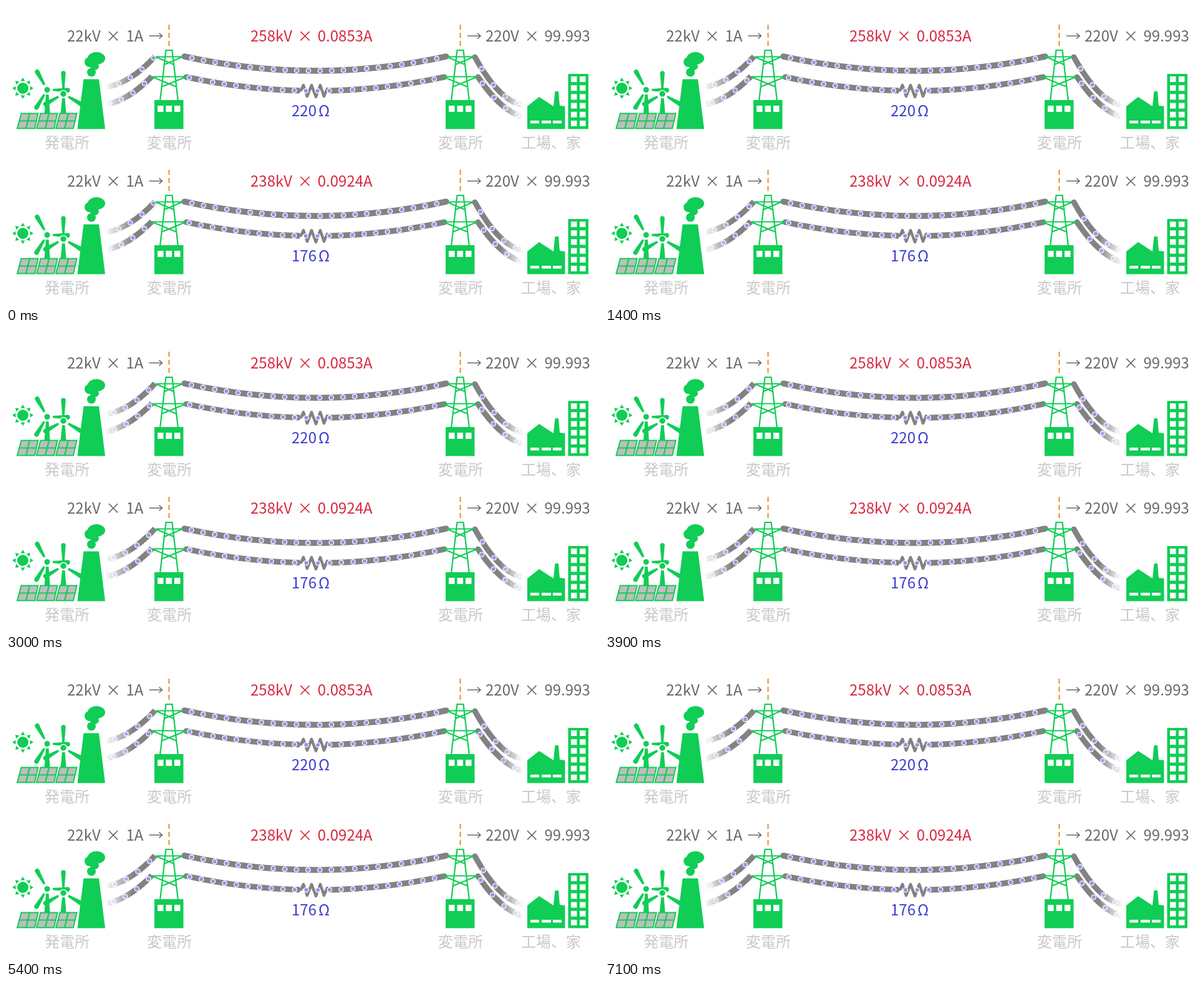
Recreate the animation shown at these times as an HTML page. Size 951x480 px, loop 7200 ms.

```html
<!DOCTYPE html>
<html lang="ja">
<head>
<meta charset="utf-8">
<style>
html, body { margin: 0; width: 100%; height: 100%; overflow: hidden; background: #fff; }
svg { display: block; width: 951px; height: 480px; }
text { font: 300 24px "Noto Sans CJK JP", "Noto Sans CJK", "Noto Sans", sans-serif; fill: #686868; word-spacing: 3px; }
.hot { fill: #d8283f; }
.ohm { fill: #3c3cd2; }
.label { fill: #c8c8c8; }
.g { fill: #10cd55; }
.gl { fill: none; stroke: #10cd55; stroke-width: 2.2; stroke-linejoin: round; }
.wire { fill: none; stroke: #828282; }
.dot { fill: #9692ec; stroke: #fff; stroke-width: 1.3; }
</style>
</head>
<body>
<svg id="stage" viewBox="0 0 951 480">
  <defs>
    <linearGradient id="fadeL"><stop offset="0" stop-color="#fff"/><stop offset="1" stop-color="#fff" stop-opacity="0"/></linearGradient>
    <linearGradient id="fadeR"><stop offset="0" stop-color="#fff" stop-opacity="0"/><stop offset=".85" stop-color="#fff"/></linearGradient>

    <path id="blade" d="M-1.700 -9L-3.700 -33a3.700 3.700 0 0 1 7.400 0L1.700 -9z"/>

    <g id="tower">
      <path d="M261.500 30V67" fill="none" stroke="#ee8a28" stroke-width="2" stroke-dasharray="8 5"/>
      <path class="gl" d="M255.500 71H267.500M256.500 71L247 153M266.500 71L276 153
        M240 81.500H283M234 113.500H289M241 82L269 94M282 82L254 94
        M235 114L274 130M288 114L249 130"/>
      <rect class="g" x="238" y="151" width="46.500" height="46.500"/>
      <path fill="#fff" d="M243 160h9.500v10h-9.500zM256.500 160h9.500v10h-9.500zM270 160h9.500v10h-9.500z"/>
    </g>

    <g id="plant" class="g">
      <circle cx="27" cy="132" r="9"/>
      <g id="rays"></g>
      <path d="M64 142h4.500l2 31h-9zM90 148h4.500l2 25h-9z"/>
      <g id="blades"></g>
      <circle cx="66" cy="134.500" r="4.500"/>
      <circle cx="92" cy="141" r="5.500" stroke="#fff" stroke-width="1.500"/>
      <g id="panels"></g>
      <path d="M124.500 117.500H149L159 197.500H114.500z"/>
      <ellipse cx="145" cy="84" rx="14" ry="10"/>
      <ellipse cx="134" cy="90" rx="8" ry="8"/>
      <ellipse cx="142" cy="97" rx="7" ry="6"/>
      <ellipse cx="137" cy="106.500" rx="7" ry="7"/>
    </g>

    <g id="town" class="g">
      <path d="M836 197.500V161L855 146L878 161L880.500 137H886L888 160L896.500 161V197.500z"/>
      <path fill="#fff" d="M841 184h14v4.500h-14zM859 184h15v4.500h-15zM877 184h14v4.500h-14z"/>
      <rect x="901.500" y="109" width="32.500" height="88.500"/>
      <g id="windows" fill="#fff"></g>
    </g>
  </defs>
</svg>
<script>
const GAP = 18.7, STEP = 100, LOOP = 7200;
const NS = 'http://www.w3.org/2000/svg';
const $ = id => document.getElementById(id);
const range = (n, f) => Array.from({ length: n }, (_, i) => f(i));

// Wires are parabolas: ends (x0,y0) (x1,y1) and control height c.
const wire = (x0, y0, x1, y1, c, width, cap = 'round') => ({ x0, y0, x1, y1, c, width, cap });
const W = {
  left: [wire(162, 130, 239, 81, 123, 9, 'butt'), wire(162, 158, 234, 113, 150, 9, 'butt')],
  mid: [wire(286, 81, 706, 81, 127, 9.5), wire(289, 114, 703, 114, 158.5, 9)],
  right: [wire(752, 82, 828, 159, 151, 9), wire(757, 114, 828, 178, 167, 9)]
};
const heightAt = (w, x) => {
  const t = (x - w.x0) / (w.x1 - w.x0), u = 1 - t;
  return u * u * w.y0 + 2 * u * t * w.c + t * t * w.y1;
};
const wirePath = w => `<path class="wire" stroke-width="${w.width}" stroke-linecap="${w.cap}"
  d="M${w.x0} ${w.y0}Q${(w.x0 + w.x1) / 2} ${w.c} ${w.x1} ${w.y1}"/>`;

const resistor = `<rect x="471" y="122" width="48" height="27" fill="#fff"/>
  <path class="wire" stroke-width="4.500" stroke-linejoin="round" stroke-linecap="round"
  d="M470 135.500H473L477 127L483 145L490 127L497 146L504 127L510 145L515 133L520 135.500"/>`;

const arrow = x => `<path d="M${x} 48H${x + 21}M${x + 16} 43.500L${x + 21} 48L${x + 16} 52.500"
  fill="none" stroke="#686868" stroke-width="1.500"/>`;
const label = (x, s) => `<text class="label" x="${x}" y="228">${s}</text>`;

const row = (i, y, volts, ohms) => `<g transform="translate(0 ${y})">
  ${Object.values(W).flat().map(wirePath).join('')}${resistor}
  <g id="dots${i}"></g>
  <rect x="159" y="76" width="44" height="100" fill="url(#fadeL)"/>
  <rect x="792" y="120" width="44" height="76" fill="url(#fadeR)"/>
  <use href="#tower"/><use href="#tower" x="467"/>
  <use href="#plant"/><use href="#town"/>
  <text x="98" y="57">22kV × 1A</text>${arrow(229.5)}
  <text class="hot" x="392" y="57">${volts}</text>
  ${arrow(740)}<text x="769" y="57">220V × 99.993</text>
  <text class="ohm" x="458" y="177">${ohms}<tspan dx="3">Ω</tspan></text>
  ${label(62, '発電所')}${label(226, '変電所')}${label(693, '変電所')}${label(826, '工場、家')}
</g>`;

const turbine = (x, y, turn) => range(3, i =>
  `<use href="#blade" transform="translate(${x} ${y}) rotate(${turn + i * 120})"/>`).join('');

$('rays').innerHTML = range(8, i =>
  `<path d="M23.500 120.500L27 115L30.500 120.500z" transform="rotate(${i * 45} 27 132)"/>`).join('');
$('blades').innerHTML = turbine(66, 134.5, -29) + turbine(92, 141, 0);
$('panels').innerHTML = [18, 49, 80].map(x => `<g transform="translate(${x} 172.5)">
  <path d="M6.500 0H33.500L28 24H0z" fill="#bebebe" stroke="#10cd55" stroke-width="2"/>
  <path class="gl" stroke-width="1.800" d="M20 0L14 24M3.500 12H31"/></g>`).join('');
$('windows').innerHTML = range(12, i =>
  `<rect x="${906 + i % 2 * 14}" y="${113 + (i >> 1) * 14.2}" width="9.500" height="9"/>`).join('');
$('stage').insertAdjacentHTML('beforeend',
  row(0, 0, '258kV × 0.0853A', '220') + row(1, 233, '238kV × 0.0924A', '176'));

// Step, swing of the 1 A side, then first dot on the 100 A side of each row.
const KEYS = [
  [0, 12, 763, 761], [8, -1, 757, 756], [19, 2, 758, 768], [30, 4, 764, 764],
  [47, -3, 756, 755], [61, 2, 758.5, 757.5], [71, 0, 766, 762]
];
const TURNS = 3;

function pose(step) {
  let i = 0;
  while (i < KEYS.length - 2 && step >= KEYS[i + 1][0]) i++;
  const a = KEYS[i], b = KEYS[i + 1];
  const u = Math.min(1, (step - a[0]) / (b[0] - a[0]));
  const e = (1 - Math.cos(Math.PI * u)) / 2;
  const mix = n => a[n] + (b[n] - a[n]) * e;
  const rush = (i % 2 ? -1 : 1) * TURNS * GAP * e;
  return { swing: mix(1) + 6 * Math.sin(Math.PI * u) ** 2, load: [mix(2) + rush, mix(3) + rush] };
}

const pools = [0, 1].map(i => range(70, () => {
  const c = document.createElementNS(NS, 'circle');
  c.setAttribute('class', 'dot');
  c.setAttribute('r', 3.7);
  return $('dots' + i).appendChild(c);
}));

function draw(step) {
  const { swing, load } = pose(step);
  [0.0853, 0.0924].forEach((amps, i) => {
    let n = 0;
    const fill = (w, phase, pad) => {
      const lo = w.x0 + pad;
      let x = lo + ((phase - lo) % GAP + GAP) % GAP;
      for (; x <= w.x1 - pad; x += GAP) {
        const c = pools[i][n++];
        c.setAttribute('cx', x.toFixed(2));
        c.setAttribute('cy', heightAt(w, x).toFixed(2));
        c.style.display = '';
      }
    };
    fill(W.left[0], 206 + swing, 1);
    fill(W.left[1], 196.7 - swing, 1);
    fill(W.mid[0], 297 + swing * amps, 4);
    fill(W.mid[1], 295 - swing * amps, 4);
    fill(W.right[0], load[i], 2);
    fill(W.right[1], 1527 - load[i], 2);
    for (; n < pools[i].length; n++) pools[i][n].style.display = 'none';
  });
}

const start = performance.now();
let last = -1;
function tick() {
  const step = Math.floor((performance.now() - start) % LOOP / STEP);
  if (step !== last) draw(last = step);
  requestAnimationFrame(tick);
}
tick();
</script>
</body>
</html>
```
